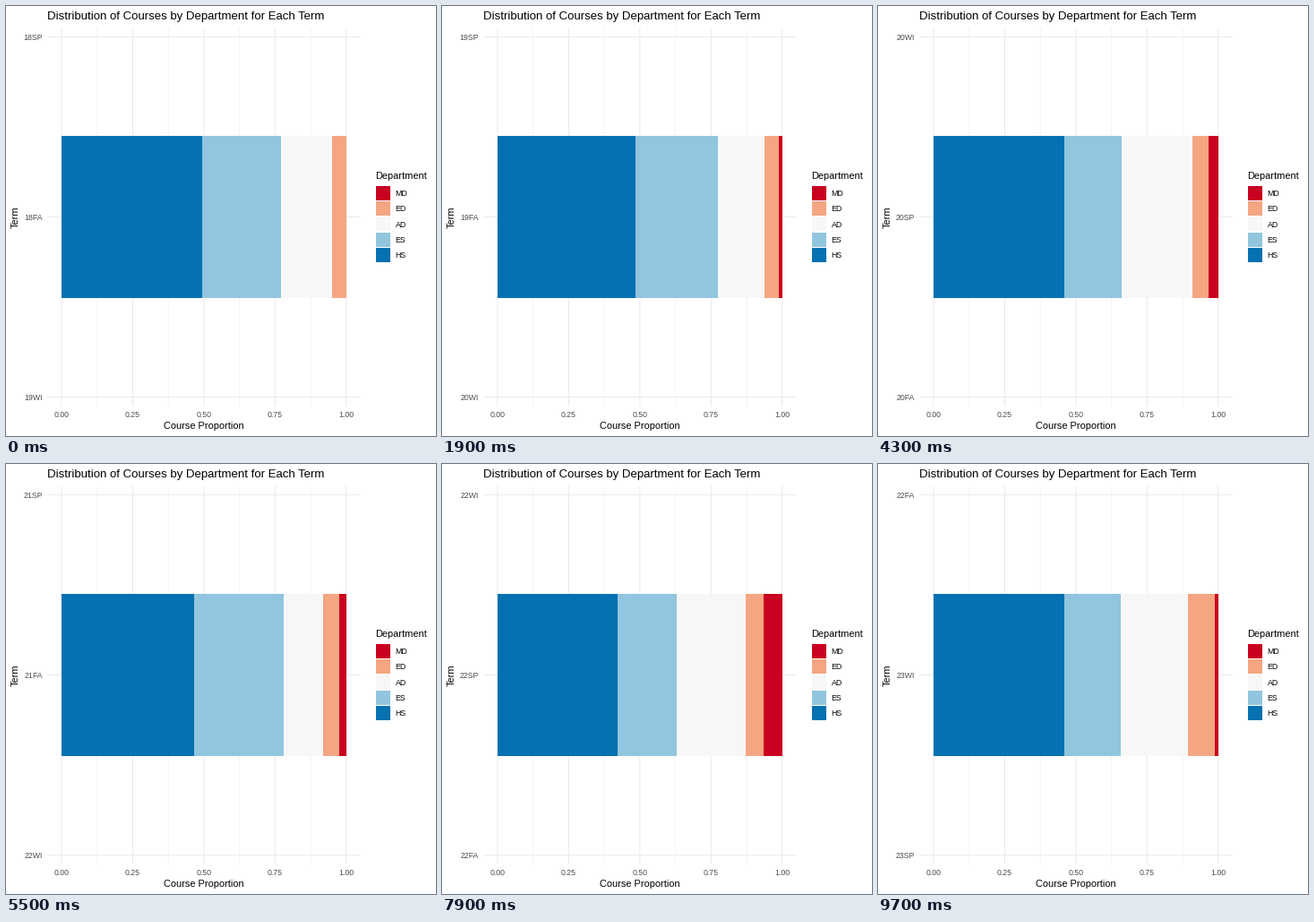
A matplotlib script that plays this animation: 480 by 480 pixels, repeating every 10000 ms.

```python
import numpy as np
import matplotlib.pyplot as plt
from matplotlib.animation import FuncAnimation
from matplotlib.patches import Rectangle

plt.rcParams["font.family"] = "Liberation Sans"
plt.rcParams["toolbar"] = "None"

SIZE = 480
DPI = 72
LEFT, WIDTH = 62, 317.7
MIDDLE, ROW = 235.5, 201.1
PANEL = dict(left=46, right=396, top=24.3, bottom=446.7)

DEPARTMENTS = {
    "HS": "#0571b0",
    "ES": "#92c5de",
    "AD": "#f7f7f7",
    "ED": "#f4a582",
    "MD": "#ca0020",
}

# Right edges of the HS, ES, AD and ED segments, in pixels; terms run in calendar order.
EDGES = {
    "18WI": (253, 306, 362, 369),
    "18SP": (230, 297, 358, 376),
    "18FA": (219, 307, 364, 380),
    "19WI": (219, 277, 356, 373),
    "19SP": (214, 275, 354, 372),
    "19FA": (216, 308, 360, 376),
    "20WI": (214, 278, 357, 380),
    "20SP": (208, 272, 351, 369),
    "20FA": (213, 308, 354, 370),
    "21WI": (211, 277, 347, 373),
    "21SP": (202, 267, 345, 370),
    "21FA": (210, 310, 354, 372),
    "22WI": (209, 274, 342, 363),
    "22SP": (196, 262, 339, 359),
    "22FA": (207, 306, 356, 376),
    "23WI": (208, 271, 346, 376),
    "23SP": (202, 267, 342, 369),
}
TERMS = list(EDGES)
PLAY_ORDER = sorted(TERMS)
STARTS = [0, 6] + list(range(13, 98, 6))
FRAMES, INTERVAL = 100, 100

fig = plt.figure(figsize=(SIZE / DPI, SIZE / DPI), dpi=DPI, facecolor="white")
ax = fig.add_axes([0, 0, 1, 1])
ax.set_xlim(0, SIZE)
ax.set_ylim(SIZE, 0)
ax.axis("off")


def label(x, y, text, size, color="black", ha="left", **kw):
    return ax.text(x, y, text, size=size, color=color, ha=ha, va="baseline", **kw)


def grid_line(xs, ys, width=1.07):
    line, = ax.plot(xs, ys, color="#ebebeb", lw=width, solid_capstyle="butt",
                    snap=False, zorder=1)
    return line


def block(x, y, w, h, color):
    return ax.add_patch(Rectangle((x, y), w, h, fc=color, lw=0, zorder=2))


# Vertical grid and x axis
for i in range(9):
    x = LEFT + WIDTH * i / 8
    major = i % 2 == 0
    grid_line([x, x], [PANEL["top"], PANEL["bottom"]], 1.07 if major else 0.53)
    if major:
        label(x, 459.2, f"{i / 8:.2f}", 8.8, "#4d4d4d", "center")

label(46, 15, "Distribution of Courses by Department for Each Term", 13.2)
label(221, 472, "Course Proportion", 11, ha="center")
label(13.5, MIDDLE, "Term", 11, ha="center", rotation=90, rotation_mode="anchor")

# Legend
label(412, 193, "Department", 11)
for k, (name, color) in enumerate(reversed(DEPARTMENTS.items())):
    y = 200.4 + 17.28 * k
    block(413, round(y + 0.5), 16, 16, color)
    label(434.7, y + 11.8, name, 8.8)

# Term rows: the one before, the current one, the one after
rows = []
for step in (-1, 0, 1):
    y = MIDDLE + step * ROW
    line = grid_line([PANEL["left"], PANEL["right"]], [y, y])
    rows.append((step, line, label(41.2, y + 3.2, "", 8.8, "#4d4d4d", "right")))

bars = [block(LEFT, 145, 0, 181, color) for color in DEPARTMENTS.values()]


def update(frame):
    state = np.searchsorted(STARTS, frame, side="right") - 1
    term = PLAY_ORDER[state]
    index = TERMS.index(term)

    for step, line, text in rows:
        shown = 0 <= index + step < len(TERMS)
        line.set_visible(shown)
        text.set_text(TERMS[index + step] if shown else "")

    edges = (LEFT, *EDGES[term], 380)
    for bar, start, end in zip(bars, edges, edges[1:]):
        bar.set_x(start)
        bar.set_width(end - start)
        bar.set_visible(end > start)
    return bars


anim = FuncAnimation(fig, update, frames=FRAMES, interval=INTERVAL, repeat=True)
plt.show()
```
